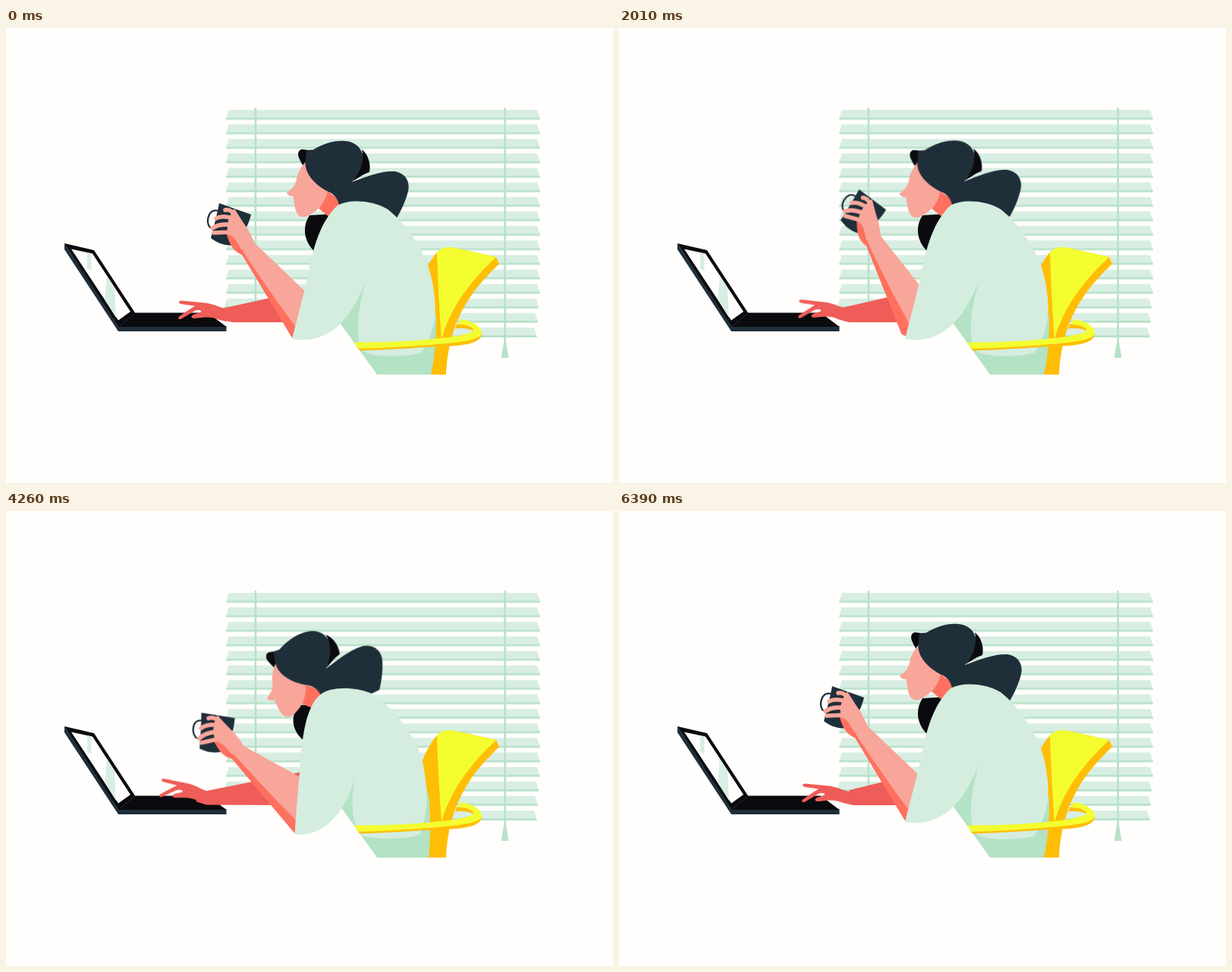
Write an HTML page without scripts that moves like this. It is 800x600 px and loops after 7.2 s.

```html
<!DOCTYPE html>
<html lang="en">
<head>
<meta charset="utf-8">
<title>Coffee at the desk</title>
<style>
html, body { margin: 0; width: 100%; height: 100%; overflow: hidden; background: #fffefc; }
svg { display: block; width: 800px; height: 600px; }

.slat { fill: #d9eee3; }
.line { fill: #b7e2c9; }
.black { fill: #0b0a0e; }
.navy { fill: #1f2f3a; }
.skin { fill: #f8a59a; }
.coral { fill: #ff705f; }
.red { fill: #ef5d58; }
.mint { fill: #d4eddf; }
.green { fill: #b3e2c4; }
.yellow { fill: #f3fd30; }
.amber { fill: #ffbe05; }
.finger { fill: none; stroke: #f8a59a; stroke-width: 5.6; stroke-linecap: round; }

/* --a: rest, --b: leaning forward, --s: sipping, --r / --l: typing right / left */
.lean, .reach, .slide { d: var(--a); }
.lean, .reach, .slide, .shift, .nod, .cup, .hand { animation: 7200ms linear infinite; }
.lean { animation-name: lean; }
.shift { animation-name: shift; }
.nod { animation-name: nod; transform-origin: 425px 235px; }
.reach { animation-name: reach; }
.cup { animation-name: cup; transform-origin: 308px 282px; }
.slide { animation-name: slide; }
.hand { animation-name: hand; transform-origin: 290px 378px; }

@keyframes lean {
  0% { d: var(--a); }
  46.25% { d: var(--a); animation-timing-function: cubic-bezier(.6,0,.5,1); }
  66.67% { d: var(--b); }
  77.5% { d: var(--b); animation-timing-function: cubic-bezier(.65,0,.65,1); }
  88.75%, 100% { d: var(--a); }
}
@keyframes shift {
  0% { transform: translate(0, 0); }
  46.25% { transform: translate(0, 0); animation-timing-function: cubic-bezier(.6,0,.5,1); }
  66.67% { transform: translate(-33px, 18px); }
  77.5% { transform: translate(-33px, 18px); animation-timing-function: cubic-bezier(.65,0,.65,1); }
  88.75%, 100% { transform: translate(0, 0); }
}
@keyframes nod {
  0% { transform: rotate(0deg); }
  4.58% { transform: rotate(0deg); animation-timing-function: ease-in-out; }
  15.83% { transform: rotate(-2deg); }
  21.67% { transform: rotate(-2deg); animation-timing-function: ease-in-out; }
  34.17% { transform: rotate(-.8deg); }
  43.75% { transform: rotate(-.8deg); animation-timing-function: cubic-bezier(.37,0,.63,1); }
  65.28% { transform: rotate(-21deg); }
  69.44% { transform: rotate(-21deg); animation-timing-function: cubic-bezier(.6,0,.6,1); }
  88.75%, 100% { transform: rotate(0deg); }
}
@keyframes reach {
  0% { d: var(--a); }
  4.58% { d: var(--a); animation-timing-function: cubic-bezier(.5,0,.5,1); }
  15.83% { d: var(--s); }
  21.67% { d: var(--s); animation-timing-function: cubic-bezier(.5,0,.5,1); }
  34.17% { d: var(--a); }
  46.25% { d: var(--a); animation-timing-function: cubic-bezier(.6,0,.5,1); }
  66.67% { d: var(--b); }
  77.5% { d: var(--b); animation-timing-function: cubic-bezier(.65,0,.65,1); }
  88.75%, 100% { d: var(--a); }
}
@keyframes cup {
  0% { transform: translate(0, 0) rotate(0deg); }
  4.58% { transform: translate(0, 0) rotate(0deg); animation-timing-function: cubic-bezier(.5,0,.5,1); }
  15.83% { transform: translate(38px, -25px) rotate(35deg); }
  21.67% { transform: translate(38px, -25px) rotate(35deg); animation-timing-function: cubic-bezier(.5,0,.5,1); }
  34.17% { transform: translate(0, 0) rotate(0deg); }
  46.25% { transform: translate(0, 0) rotate(0deg); animation-timing-function: cubic-bezier(.6,0,.5,1); }
  66.67% { transform: translate(-20.7px, 41.3px) rotate(-15deg); }
  77.5% { transform: translate(-20.7px, 41.3px) rotate(-15deg); animation-timing-function: cubic-bezier(.65,0,.65,1); }
  88.75%, 100% { transform: translate(0, 0) rotate(0deg); }
}
@keyframes slide {
  0% { d: var(--a); }
  22.2% { d: var(--a); animation-timing-function: ease-in-out; }
  34% { d: var(--r); }
  45.83% { d: var(--r); animation-timing-function: cubic-bezier(.65,0,.65,1); }
  58.33% { d: var(--l); }
  76.4% { d: var(--l); animation-timing-function: cubic-bezier(.4,0,.4,1); }
  88.75%, 100% { d: var(--r); }
}
@keyframes hand {
  0% { transform: translate(0, 0) rotate(0deg); }
  22.2% { transform: translate(0, 0) rotate(0deg); animation-timing-function: ease-in-out; }
  34% { transform: translate(19px, -1px) rotate(2deg); }
  45.83% { transform: translate(19px, -1px) rotate(2deg); animation-timing-function: cubic-bezier(.65,0,.65,1); }
  58.33% { transform: translate(-25px, -.5px) rotate(6deg); }
  76.4% { transform: translate(-25px, -.5px) rotate(6deg); animation-timing-function: cubic-bezier(.4,0,.4,1); }
  88.75%, 100% { transform: translate(14px, 0) rotate(0deg); }
}
</style>
</head>
<body>
<svg viewBox="0 0 800 600" xmlns="http://www.w3.org/2000/svg">
  <defs>
    <pattern id="slats" x="290" y="108" width="414" height="19.13" patternUnits="userSpaceOnUse">
      <path class="slat" d="M3.5,0H410L413.5,10.5H.5Z"/>
      <path class="line" d="M.5,10.2H413.5L414,13H0Z"/>
    </pattern>
  </defs>

  <!-- blinds -->
  <rect x="290" y="108" width="414" height="248.6" fill="url(#slats)"/>
  <path class="slat" d="M291,356.7H698.5L702,367.5H288Z M480,375.8H697L701,386.5H480Z M480,395H696L699.5,405.5H480Z"/>
  <path class="line" d="M288.5,367H701.5L702,369.7H288Z M480,386H700.5L701,388.8H480Z M480,405.2H699L700,408H480Z"/>
  <path class="line" d="M327.6,105h2.6V368h-2.6Z M656.3,105h2.6V413L662.5,435H652.5L656.3,413Z"/>

  <!-- chair back -->
  <path class="amber" d="M568,296C574,289 582,289 592,290L646,302L650,311C618,342 584,380 580,457H545V340C552,318 562,302 568,296Z"/>
  <path class="yellow" d="M568,296C574,289 582,288.500 592,290L646,302C625,322 587,360 574,411C571,370 569,330 568,296Z"/>

  <!-- laptop -->
  <path class="navy" d="M77,284V292L148,400H290.500V393L149,392Z"/>
  <path class="black" d="M77,284L116,293L170,375.500H266L290.500,394H149Z"/>
  <path d="M86,291.500L114,297.500L164,374L148,385.500Z" fill="#fffefc"/>
  <path class="slat" d="M107,296L112.500,297.300V320L107,318Z M133,327L143,342.500L145,382L130,358Z"/>
  <path d="M169,377L150,392.500" stroke="#1f2f3a" stroke-width="1"/>

  <!-- typing arm -->
  <path class="red slide" style="
    --a:path('M286,369.500L385,348L395,388L298,388L280,384Z');
    --r:path('M304,368L385,348L395,388L308,388L296,383Z');
    --l:path('M262,369.500L400,342L395,388L264,387.500L250,383Z')"/>
  <path class="red hand" d="M231,359.500C227,359.500 227,363.500 231,364L249,366.500C243,370 235,375.500 228,380.500C225.500,384 229.500,385 232,383L247,374C252,371 258,371.500 257,374.500L247,378C243,380 244,383 248,383L262,381.500C270,381 274,382 280,384.500L290,387L298,380L292,370.500C288,371 276,365 265,362.800Z"/>

  <!-- hair behind the neck -->
  <path class="black lean" style="
    --a:path('M400,247C390,262 392,282 408,296C412,280 420,262 432,245Z');
    --b:path('M384,259C368,268 367,292 388,307C390,290 393,275 402,262Z')"/>

  <!-- head -->
  <g class="shift"><g class="nod">
    <path class="coral" d="M422,214L439,226V236L428,251L412,238C418,230 421,222 422,214Z"/>
    <path class="skin" d="M394,177C388,185 384,192 383,200C381,208 377,212 370,217C371,221 375,222 379,222C378,225 380,228 380,232C381,236 381,240 384,245C388,251 395,250 401,246C412,240 421,230 424,215L405,180Z"/>
    <path class="black" d="M399,161L390,160C385,161 384,166 386,171Q388,176 391,181L396,175Z"/>
    <path class="navy" d="M396,161L405,160.500C421,150 445,145 458,152C470,158 474,172 468,184C465,192 460,198 456,203C475,196 495,188 512,189C526,191 533,202 530,215C527,228 520,242 515,250.500C490,256 450,250 439,234C437,222 430,218 423,215C408,207 393,192 394.500,176Z"/>
    <path class="black" d="M469,160C478,167 481,180 479,190C472,192 464,198 457,202C466,190 473,177 469,160Z"/>
  </g></g>

  <!-- forearm -->
  <path class="coral reach" style="
    --a:path('M294,272C294,285 300,294 311,299L376,407L378,409L382,393C360,365 330,320 312,290C306,280 304,273 294,272Z');
    --s:path('M337,243C333,255 337,268 341,275L369,401L379,404L384,386C370,350 355,310 344,268C346,262 346,250 337,243Z');
    --b:path('M274,315C276,325 283,335 292,338L381,431L383,432L384,414C355,385 320,355 294,329C288,322 284,315 274,315Z')"/>
  <path class="skin reach" style="
    --a:path('M308,288L327,283L394,347C389,362 386,378 382,394C360,365 330,322 308,288Z');
    --s:path('M343,266L361,263L398,331C393,350 389,368 384,388C370,350 355,310 343,266Z');
    --b:path('M290,327L304,319L386,353C385,375 385,395 385,417C355,388 320,357 290,327Z')"/>

  <!-- body -->
  <path class="green lean" style="
    --a:path('M475,333L438,386L489,457L560,457C566,430 567,405 567,380L555,340Z');
    --b:path('M454,358L441,390L489,457L556,457C557,430 556,410 554,380L545,340Z')"/>
  <path class="mint lean" style="
    --a:path('M437,234C450,226 482,226 503,239C530,260 556,300 562,335C569,375 567,395 548,428C525,435 485,434 472,427C460,418 461,375 475,333C465,355 450,395 412,408C400,412 388,412 377,410C383,385 393,350 398,325C405,290 414,255 437,234Z');
    --b:path('M404,246C418,233 450,234 470,240C500,255 536,295 545,335C552,370 552,400 545,426C525,434 485,432 470,429C452,415 451,385 454,358C450,380 437,410 413,426C403,432 393,434 382,433C382,405 382,370 383,345C384,305 386,262 404,246Z')"/>

  <!-- armrest -->
  <path class="amber" d="M462,419L466,425.500C500,424.500 540,422 572,419.500C605,420 627,415 627,403L622,400L580,410Z"/>
  <path class="amber" d="M594,390C606,390 617,394 617,400C612,397 604,395 592,396.500Z"/>
  <path class="yellow" d="M459,414.500C510,415 560,411 590,407C608,404 618,401 616,397C614,393 605,391 596,391L599,384C615,386 627,394 627,402C627,411 600,414 580,416C550,419 500,422 465,423Z"/>

  <!-- mug and hand -->
  <g class="cup">
    <path d="M279,241C268,238 263,253 268,262Q270,264 274,263" fill="none" stroke="#1f2f3a" stroke-width="2.2"/>
    <path class="navy" d="M281,231L323,246C319,262 310,278 300,286C290,288 277,283 270,277C274,262 278,246 281,231Z"/>
    <path class="coral" d="M290,270C294,282 297,293 311,299L314,290L300,268Z"/>
    <path class="skin" d="M301,238C306,246 312,256 318,264C323,273 326,279 328,285L311,293C305,284 302,275 293,272C290,262 292,250 301,238Z"/>
    <path class="finger" d="M289,240Q297,238 304,250M277,251Q285,246 302,252M272,264Q282,257 300,260M274,270L298,269"/>
  </g>
</svg>
</body>
</html>
```
